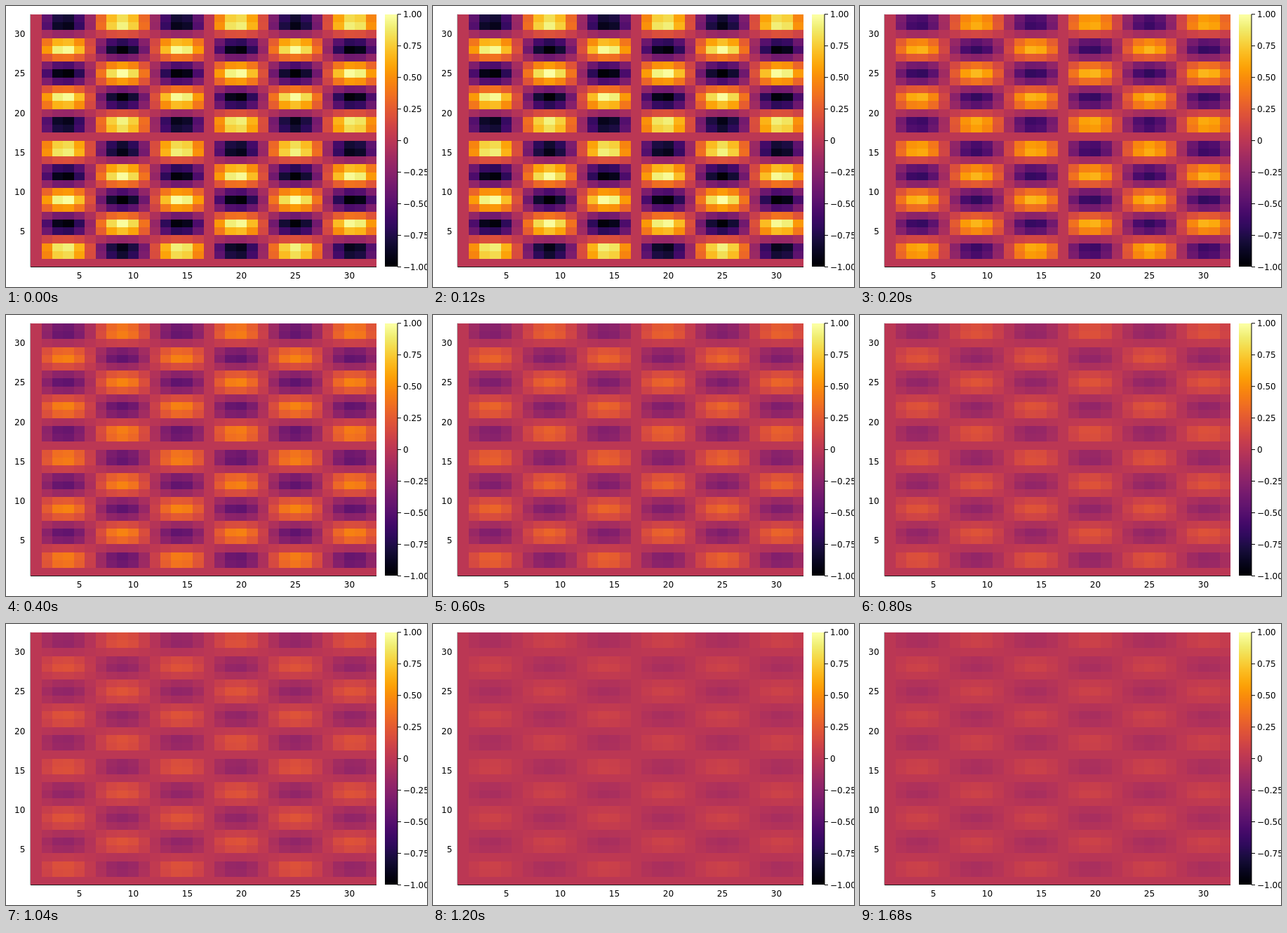
An HTML page with a canvas for the animation above (2000 ms loop, 600 by 400 pixels).

```html
<!DOCTYPE html>
<html lang="en">
<head>
<meta charset="utf-8">
<title>Decaying standing wave heatmap</title>
<style>
html, body { margin: 0; width: 100%; height: 100%; overflow: hidden; background: #fff; }
canvas, svg { position: absolute; left: 0; top: 0; width: 600px; height: 400px; }
text { font: 12px "DejaVu Sans", Verdana, sans-serif; fill: #000; }
path { stroke: #000; stroke-width: 1; fill: none; }
</style>
</head>
<body>
<canvas id="plot" width="600" height="400"></canvas>
<svg id="labels" viewBox="0 0 600 400"></svg>
<script>
const N = 32, LOOP = 2000, DECAY = 0.68;
const box = { x: 35.2, y: 11.8, w: 492.8, h: 359.6 };
const bar = { x: 540, w: 18 };
// [start ms, decay steps so far]
const steps = [[0, 0], [200, 1], [400, 2], [600, 3], [800, 4], [1200, 6]];

const inferno = ("000004 08051E 180C3C 2F0A5B 450A69 5C126E 71196E 87216B 9B2964 B1325A " +
  "C43C4E D74B3F E55C30 F1711F F8870E FCA108 FBBA1F F6D543 F1ED71 FCFFA4")
  .split(" ").map(h => [0, 2, 4].map(i => parseInt(h.substr(i, 2), 16)));

// Catmull-Rom through the palette stops, v in [-1, 1]
function color(v) {
  const last = inferno.length - 1;
  const p = Math.min(Math.max((v + 1) / 2, 0), 1) * last;
  const i = Math.min(Math.floor(p), last - 1), t = p - i;
  const at = k => inferno[Math.min(Math.max(k, 0), last)];
  return [0, 1, 2].map(c => {
    const [a, b, d, e] = [at(i - 1)[c], at(i)[c], at(i + 1)[c], at(i + 2)[c]];
    const s = b + 0.5 * t * (d - a + t * (2 * a - 5 * b + 4 * d - e + t * (3 * (b - d) + e - a)));
    return Math.min(255, Math.max(0, Math.round(s)));
  });
}

const ctx = document.getElementById("plot").getContext("2d");
const grid = document.createElement("canvas");
grid.width = grid.height = N;
const gctx = grid.getContext("2d");
const cells = gctx.createImageData(N, N);
const wave = (k, n) => Math.sin(2 * Math.PI * k * n / N);

function drawField(amp) {
  for (let r = 0; r < N; r++) {
    for (let c = 0; c < N; c++) {
      const v = amp * wave(3, c) * wave(5, r);
      cells.data.set([...color(v), 255], ((N - 1 - r) * N + c) * 4);
    }
  }
  gctx.putImageData(cells, 0, 0);
  const { x, y, w, h } = box;
  ctx.clearRect(0, 0, bar.x - 2, 400);
  ctx.lineWidth = 1;
  ctx.strokeStyle = "#000";
  ctx.beginPath();
  ctx.moveTo(x, y);
  ctx.lineTo(x, y + h);
  ctx.lineTo(x + w, y + h);
  ctx.stroke();
  ctx.imageSmoothingEnabled = false;
  ctx.drawImage(grid, x, y, w, h);
}

function drawBar() {
  const top = Math.round(box.y), bottom = Math.round(box.y + box.h);
  for (let y = top; y < bottom; y++) {
    const v = 1 - 2 * (y + 0.5 - top) / (bottom - top);
    ctx.fillStyle = `rgb(${color(v)})`;
    ctx.fillRect(bar.x, y, bar.w, 1);
  }
}

function drawLabels() {
  const { x, y, w, h } = box, out = [], edge = bar.x + bar.w;
  const label = (s, tx, ty, anchor) =>
    out.push(`<text x="${tx}" y="${ty}" text-anchor="${anchor}">${s}</text>`);
  for (let n = 5; n <= 30; n += 5) {
    label(n, x + (n - 0.5) * w / N, 388, "middle");
    label(n, 27.3, y + h - (n - 0.5) * h / N + 4.4, "end");
  }
  let d = `M${edge} ${y}V${y + h}`;
  for (let i = -4; i <= 4; i++) {
    const ty = y + h * (4 - i) / 8;
    const s = i ? (i < 0 ? "\u2212" : "") + Math.abs(i / 4).toFixed(2) : "0";
    d += `M${edge} ${ty}h5`;
    label(s, 566, ty + 4.4, "start");
  }
  document.getElementById("labels").innerHTML = `<path d="${d}"/>` + out.join("");
}

let shown = -1;
function frame(now) {
  const t = Math.max(0, now - start) % LOOP;
  const n = steps.filter(s => s[0] <= t).pop()[1];
  if (n !== shown) drawField(DECAY ** n);
  shown = n;
  requestAnimationFrame(frame);
}

drawBar();
drawLabels();
const start = performance.now();
frame(start);
</script>
</body>
</html>
```
